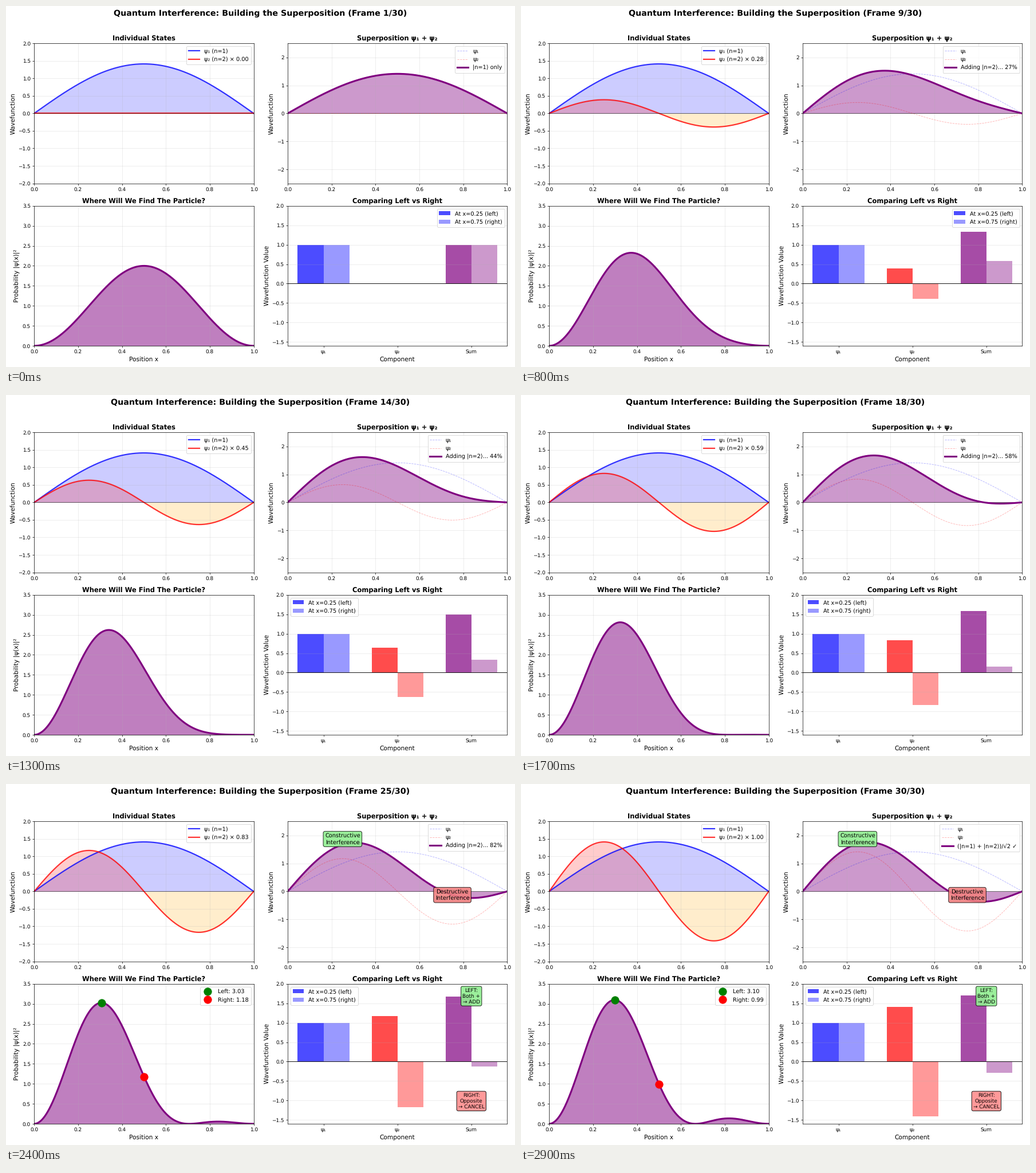
These frames come from a looping animation (889 px wide and 630 px high, 3 s). A matplotlib script:

```python
import numpy as np
import matplotlib.pyplot as plt
from matplotlib.animation import FuncAnimation

W, H, DPI = 889, 630, 64
STEPS = 30
NOTE_FROM = 0.7  # share of the second state at which the notes appear

plt.rcParams["font.family"] = "DejaVu Sans"
plt.rcParams["text.hinting"] = "none"
fig = plt.figure(figsize=(W / DPI, H / DPI), dpi=DPI, facecolor="white")
heading = fig.text(0.5, 1 - 17 / H, "", ha="center", va="baseline",
                   fontsize=16, fontweight="bold")

x = np.linspace(0, 1, 1000)
psi1 = np.sqrt(2) * np.sin(np.pi * x)
psi2 = np.sqrt(2) * np.sin(2 * np.pi * x)


def panel(left, top, title, ylabel, ylim, xlabel="", grid="both"):
    width, height = 383.4, 244.2
    ax = fig.add_axes([left / W, 1 - (top + height) / H, width / W, height / H])
    ax.set_title(title, fontsize=13, fontweight="bold")
    ax.set_ylabel(ylabel, fontsize=12)
    ax.set_xlabel(xlabel, fontsize=12)
    ax.set_xlim(0, 1)
    ax.set_ylim(*ylim)
    ax.grid(True, alpha=0.3, axis=grid)
    return ax


LEFT, RIGHT, TOP, BOTTOM = 49.2, 492, 65.3, 348.8
states = panel(LEFT, TOP, "Individual States", "Wavefunction", (-2, 2))
total = panel(RIGHT, TOP, "Superposition ψ₁ + ψ₂", "Wavefunction", (-2.5, 2.5))
chance = panel(LEFT, BOTTOM, "Where Will We Find The Particle?",
               "Probability |ψ(x)|²", (0, 3.5), "Position x")
compare = panel(RIGHT, BOTTOM, "Comparing Left vs Right", "Wavefunction Value",
                (-1.6, 2), "Component", grid="y")

# Parts that never change
states.axhline(0, color="black", lw=0.6, zorder=2.5)
line1, = states.plot(x, psi1, color="blue", lw=2.5, alpha=0.8, label="ψ₁ (n=1)")
states.fill_between(x, 0, psi1, color="blue", alpha=0.2, lw=0)
total.axhline(0, color="black", lw=0.6)
dash1, = total.plot(x, psi1, "--", color="blue", lw=1, alpha=0.3, label="ψ₁")
compare.axhline(0, color="black", lw=1)
compare.set_xticks(range(3), ["ψ₁", "ψ₂", "Sum"])

moving = []


def curve(ax, y, style="-", **kw):
    line, = ax.plot(x, y, style, **kw)
    moving.append(line)
    return line


def shade(ax, y, color, alpha, where=None):
    moving.append(ax.fill_between(x, 0, y, where=where, color=color,
                                  alpha=alpha, lw=0))


def note(ax, px, py, text, size, color, alpha=0.9):
    box = dict(boxstyle="round", facecolor=color, alpha=alpha)
    moving.append(ax.text(px, py, text, ha="center", fontsize=size, bbox=box))


def peak(mask, prob, color, name):
    i = np.argmax(np.where(mask, prob, -1))
    dot, = chance.plot(x[i], prob[i], "o", color=color, ms=15,
                       label=f"{name}: {prob[i]:.2f}")
    moving.append(dot)
    return dot


def sum_label(share):
    if share < 0.05:
        return "|n=1⟩ only"
    if share < 0.95:
        return f"Adding |n=2⟩... {int(share * 100)}%"
    return "(|n=1⟩ + |n=2⟩)/√2 ✓"


def draw_bars(share, norm):
    for side, sign, alpha, name in ((-1, 1, 0.7, "At x=0.25 (left)"),
                                    (1, -1, 0.4, "At x=0.75 (right)")):
        second = sign * share * np.sqrt(2)
        values = [1, second, (1 + second) / norm]
        bars = compare.bar(np.arange(3) + side * 0.175, values, 0.35,
                           color=["blue", "red", "purple"], alpha=alpha,
                           label=name)
        moving.append(bars)
    compare.set_xlim(-0.485, 2.485)
    compare.set_ylim(-1.6, 2)
    compare.legend(loc="best", fontsize=11)


def draw(step):
    for artist in moving:
        artist.remove()
    moving.clear()
    if chance.get_legend():
        chance.get_legend().remove()

    share = step / (STEPS - 1)
    norm = np.sqrt(1 + share ** 2)
    part = share * psi2
    both = (psi1 + part) / norm
    prob = both ** 2
    heading.set_text("Quantum Interference: Building the Superposition "
                     f"(Frame {step + 1}/{STEPS})")

    line2 = curve(states, part, color="red", lw=2.5, alpha=0.8,
                  label=f"ψ₂ (n=2) × {share:.2f}")
    shade(states, part, "red", 0.2, part > 0)
    shade(states, part, "orange", 0.2, part < 0)
    states.legend(handles=[line1, line2], loc="upper right", fontsize=11)

    dash2 = curve(total, part, "--", color="red", lw=1, alpha=0.3, label="ψ₂")
    bold = curve(total, both, color="purple", lw=3.5, label=sum_label(share))
    shade(total, both, "purple", 0.4)
    total.legend(handles=[dash1, dash2, bold], loc="upper right", fontsize=11)

    curve(chance, prob, color="purple", lw=3.5)
    shade(chance, prob, "purple", 0.5)
    draw_bars(share, norm)

    if share > NOTE_FROM:
        note(total, 0.25, 1.7, "Constructive\nInterference", 11, "lightgreen")
        note(total, 0.75, -0.3, "Destructive\nInterference", 11, "lightcoral")
        dots = [peak(x < 0.5, prob, "green", "Left"),
                peak(x > 0.5, prob, "red", "Right")]
        chance.legend(handles=dots, loc="upper right", fontsize=11)
        note(compare, 2, 1.5, "LEFT:\nBoth +\n→ ADD", 10, "lightgreen")
        note(compare, 2, -1.2, "RIGHT:\nOpposite\n→ CANCEL", 10, "#ff9999", 1)
    return []


anim = FuncAnimation(fig, draw, frames=STEPS, interval=100, repeat=True,
                     repeat_delay=0, blit=False)
plt.show()
```
